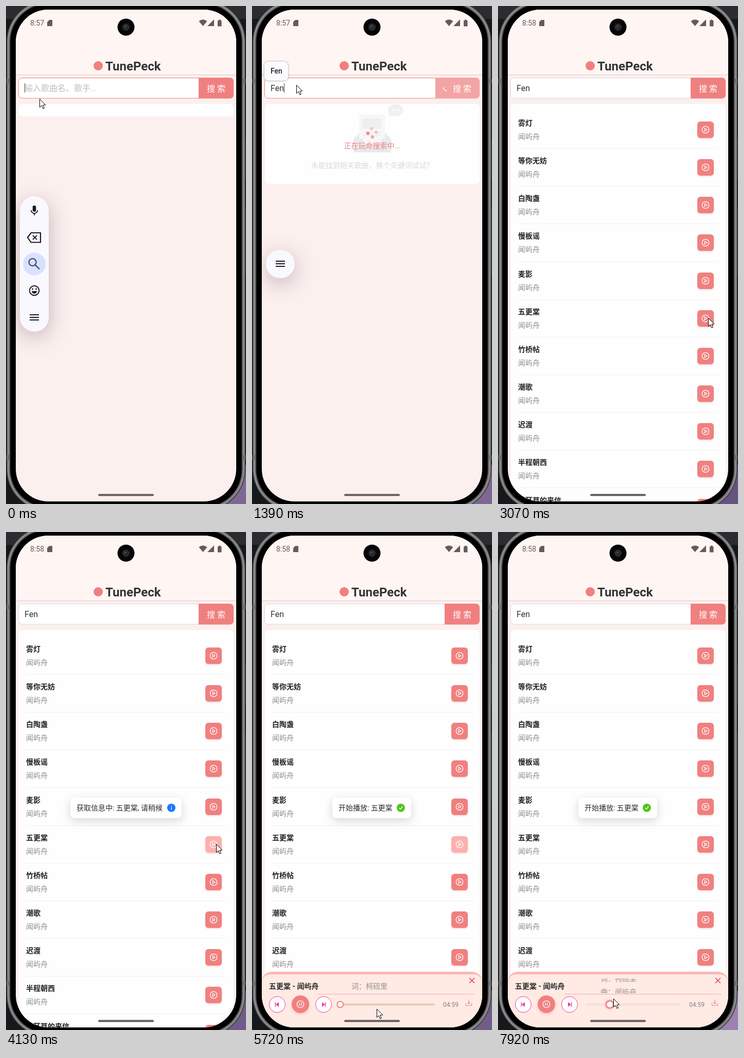
Write an HTML page with a canvas that moves like this. It is 466 by 966 pixels and loops after 7990 ms.

```html
<!DOCTYPE html>
<html lang="zh-CN">
<head>
<meta charset="utf-8">
<title>Music search</title>
<style>
html, body { margin: 0; width: 100%; height: 100%; overflow: hidden; background: #17181c; }
canvas { display: block; width: 466px; height: 966px; }
</style>
</head>
<body>
<canvas id="stage"></canvas>
<script>
const W = 466, H = 966, LOOP = 7990;
const CORAL = '#f08080', INK = '#1d1b20';
const FONT = 'Roboto, "Noto Sans CJK SC", "Noto Sans CJK", "Noto Sans", sans-serif';
const ARTIST = '闻屿舟', WRITER = '柯砚里', QUERY = 'Fen';
const SONGS = ['雾灯', '等你无妨', '白陶盏', '慢板谣', '麦影', '五更棠', '竹桥帖', '潮歌', '迟渡', '半程朝西', '苍耳草的来信'];
const PICK = 5;

const canvas = document.getElementById('stage');
const c = canvas.getContext('2d');
const dpr = window.devicePixelRatio || 1;
canvas.width = W * dpr;
canvas.height = H * dpr;

const clamp = (v, a = 0, b = 1) => Math.min(b, Math.max(a, v));
const lerp = (a, b, p) => a + (b - a) * p;
const ramp = (t, a, b) => clamp((t - a) / (b - a));
const ease = p => p * p * (3 - 2 * p);

// keys: [time, ...values]
function track(keys, t, curve = ease) {
  let i = 0;
  while (i < keys.length - 2 && t >= keys[i + 1][0]) i++;
  const [a, b] = [keys[i], keys[i + 1]];
  const p = curve(ramp(t, a[0], b[0]));
  return a.slice(1).map((v, k) => lerp(v, b[k + 1], p));
}

const POINTER = [
  [0, 65, 180], [59, 65, 180], [60, 86, 153], [1800, 86, 153], [2260, 100, 186],
  [2400, 100, 186], [3070, 408, 605], [4400, 408, 605], [5190, 160, 908],
  [5300, 160, 908], [5480, 48, 908], [5720, 242, 925], [5990, 256, 916],
  [6180, 256, 916], [6650, 170, 912], [6850, 176, 912], [6990, 219, 915],
  [7120, 214, 908], [7320, 178, 905], [7520, 178, 905], [7920, 224, 905], [7990, 226, 905]
];
const GLOW = [[0, .5], [1390, .5], [2400, .05], [4130, .3], [5720, .32], [6990, 1], [7990, .95]];

function withState(fn) { c.save(); fn(); c.restore(); }
function box(x, y, w, h, r, fill, stroke) {
  c.beginPath();
  c.roundRect(x, y, w, h, r);
  if (fill) { c.fillStyle = fill; c.fill(); }
  if (stroke) { c.strokeStyle = stroke; c.stroke(); }
}
function dot(x, y, r, fill, stroke, width = 1) {
  c.beginPath();
  c.arc(x, y, r, 0, 7);
  if (fill) { c.fillStyle = fill; c.fill(); }
  if (stroke) { c.lineWidth = width; c.strokeStyle = stroke; c.stroke(); }
}
function poly(pts, fill) {
  c.beginPath();
  pts.forEach(([x, y]) => c.lineTo(x, y));
  c.closePath();
  if (fill) { c.fillStyle = fill; c.fill(); }
}
function line(color, width, ...pts) {
  c.beginPath();
  pts.forEach(([x, y], i) => i ? c.lineTo(x, y) : c.moveTo(x, y));
  c.strokeStyle = color;
  c.lineWidth = width;
  c.stroke();
}
function text(s, x, y, size, color, weight = 400, align = 'left') {
  c.font = `${weight} ${size}px ${FONT}`;
  c.textAlign = align;
  c.fillStyle = color;
  c.fillText(s, x, y);
}
function shadow(color, blur, y) {
  c.shadowColor = color;
  c.shadowBlur = blur * dpr;
  c.shadowOffsetY = y * dpr;
}

function drawPhone(t) {
  c.fillStyle = '#17181c';
  c.fillRect(0, 0, W, H);
  c.fillStyle = '#2b2b30';
  c.fillRect(0, 0, W, 25);
  const g = track(GLOW, t, p => p)[0];
  const mix = (a, b) => Math.round(lerp(a, b, g));
  c.fillStyle = `rgb(${mix(92, 162)},${mix(74, 132)},${mix(117, 178)})`;
  c.fillRect(420, 890, 46, 76);
  [[0, '#333'], [1, '#686868'], [2.5, '#999'], [4.5, '#5a5a5a'], [5.5, '#8a8a8a'], [6.5, '#161616'], [8.5, '#000']]
    .forEach(([d, color]) => box(1 + d, -11 + d, 464 - 2 * d, 990 - 2 * d, 80 - d, color));
  c.fillStyle = '#6d6d6d';
  for (const x of [1, 459]) for (const y of [141, 871]) c.fillRect(x, y, 6, 9);
  c.fillStyle = '#333';
  c.fillRect(464, 257, 2, 78);
  c.fillRect(464, 391, 2, 130);
}

function drawHeader(t) {
  c.fillStyle = '#fcf0ef';
  c.fillRect(19, 7, 428, 954);
  c.fillStyle = '#fff6f4';
  c.fillRect(19, 7, 428, 126);
  c.fillStyle = '#e2c6c5';
  c.fillRect(19, 133, 428, 1);

  const gray = '#625d5d';
  text(t < 1550 ? '8:57' : '8:58', 47, 38, 14, gray);
  poly([[84, 27], [90, 27], [90, 39], [80, 39], [80, 31]], gray);
  c.beginPath();
  c.moveTo(382.5, 39);
  c.lineTo(374.5, 29.5);
  c.quadraticCurveTo(382.5, 23, 390.5, 29.5);
  c.fill();
  poly([[391, 39], [404, 39], [404, 26]], gray);
  box(411, 28, 7.5, 11.5, 1, gray);
  c.fillRect(413, 26.5, 3.5, 2);

  dot(233, 41, 16.5, '#050505');
  dot(233, 41, 8, '#17181a');
  dot(233, 41, 5, '#222326', '#4b4c50');
  dot(232, 40, 1.7, '#55565a');

  dot(179, 116, 9, CORAL);
  text('TunePeck', 193, 125, 24, '#333', 700);
}

function drawSearch(t) {
  const wide = ramp(t, 1000, 1060) * (1 - ramp(t, 2000, 2200));
  const edge = 374 - 18 * wide;
  const focused = t < 2470;
  c.lineWidth = 1;
  box(24.5, 139.5, edge - 24, 39.5, [7, 0, 0, 7], '#fff', focused ? CORAL : '#dcd6d6');
  box(edge, 139, 442 - edge, 40.5, [0, 7, 7, 0], wide > .5 ? '#f3a4a4' : CORAL);
  text('搜 索', 390, 166, 16, '#fff');
  if (wide > .5) withState(() => {
    c.lineCap = 'round';
    c.beginPath();
    const a = (t - 1390) / 1000 * 2 * Math.PI + Math.PI / 2;
    c.arc(378, 158, 6.5, a, a + Math.PI / 2);
    c.strokeStyle = '#fff';
    c.lineWidth = 1.4;
    c.stroke();
  });
  const typed = QUERY.slice(0, t < 400 ? 0 : 1 + Math.floor((t - 400) / 95));
  if (typed) text(typed, 36, 165, 16, '#333');
  else text('输入歌曲名、歌手...', 36, 165, 16, '#bfbfbf');
  const caretOn = t < 60 || (t >= 400 && t < 1800);
  if (caretOn) {
    c.fillStyle = '#444';
    c.fillRect(36 + (typed ? c.measureText(typed).width : 0), 150, 1, 18);
  }
}

function drawEmpty() {
  withState(() => {
    poly([[197, 258], [209, 246], [258, 246], [270, 258]], '#e9eaed');
    box(208, 211, 50, 60, 3, '#f7f7f8');
    box(214, 218, 37, 20, 2, '#eeeff1');
    for (const y of [244, 250]) box(214, y, 37, 2, 1, '#eeeff1');
    c.beginPath();
    c.moveTo(197, 258); c.lineTo(214, 258);
    c.quadraticCurveTo(219, 268, 224, 268);
    c.lineTo(243, 268);
    c.quadraticCurveTo(249, 268, 253, 258);
    c.lineTo(270, 258); c.lineTo(270, 280);
    c.quadraticCurveTo(270, 284, 266, 284);
    c.lineTo(201, 284);
    c.quadraticCurveTo(197, 284, 197, 280);
    c.fillStyle = '#e8eaed';
    c.fill();
    c.beginPath();
    c.ellipse(279, 202, 14.5, 11.5, 0, 0, 7);
    c.fillStyle = '#eef0f2';
    c.fill();
    poly([[267, 206], [265, 215], [275, 212]], '#eef0f2');
    for (const x of [273, 279, 285]) dot(x, 202, 1.8, '#fff');
    text('未能找到相关歌曲，换个关键词试试?', 230, 314, 14, '#d9d9d9', 400, 'center');
  });
}

function drawSpinner(t, alpha) {
  withState(() => {
    const a = (t - 1390) * .3 * Math.PI / 180 - .12;
    for (let i = 0; i < 4; i++) {
      const k = a + i * Math.PI / 2 - Math.PI / 2;
      c.globalAlpha = alpha * (.65 + .3 * Math.sin(t / 320 + i));
      dot(233 + 8 * Math.cos(k), 246 + 8 * Math.sin(k), 3.3, CORAL);
    }
    c.globalAlpha = alpha;
    text('正在玩命搜索中...', 233, 276, 14, CORAL, 400, 'center');
  });
}

function drawPlayIcon(x, y) {
  dot(x, y, 6.7, null, '#fff', 1.3);
  poly([[x - 1.8, y - 3], [x + 3, y], [x - 1.8, y + 3]]);
  c.lineWidth = 1.1;
  c.stroke();
}

function drawList(t) {
  const pale = ramp(t, 3470, 3560) * (1 - ramp(t, 7060, 7320));
  SONGS.forEach((name, i) => {
    const y = 73.15 * i;
    text(name, 39, 232 + y, 14, '#222', 700);
    text(ARTIST, 39, 258 + y, 14, '#8f8f8f');
    c.fillStyle = '#f0f0f0';
    c.fillRect(39, Math.round(276 + y), 389, 1);
    withState(() => {
      shadow('rgba(240,128,128,.28)', 3, 2);
      const p = i === PICK ? pale : 0;
      box(387, Math.round(224 + y), 32, 32, 6, `rgb(${lerp(240, 252, p)},${lerp(128, 176, p)},${lerp(128, 174, p)})`);
    });
    drawPlayIcon(403, Math.round(240 + y));
  });
}

function drawContent(t) {
  const loading = t >= 1000 && t < 1800;
  const listed = t >= 1800;
  box(25, 190, 417, listed ? 800 : loading ? 155 : 24, 8, '#fefefe');
  if (loading) drawEmpty();
  if (listed) withState(() => {
    c.globalAlpha = lerp(.5, 1, ramp(t, 1960, 2260));
    drawList(t);
  });
  const spin = ramp(t, 1000, 1100) * (1 - ramp(t, 1960, 2260));
  if (spin) drawSpinner(t, spin);
}

function menuIcon(y) {
  for (const d of [-5, 0, 5]) line(INK, 2, [46, y + d], [64, y + d]);
}

function drawToolbar(t) {
  if (t >= 2620) return;
  const p = ease(ramp(t, 560, 860));
  const top = lerp(369, 473, p), bottom = lerp(632, 528, p);
  withState(() => {
    c.globalAlpha = 1 - ramp(t, 2470, 2620);
    withState(() => {
      shadow('rgba(70,40,50,.3)', 40, 10);
      box(27, top, 56, bottom - top, 28, '#f9f8ff');
    });
    c.lineCap = 'butt';
    menuIcon(lerp(604, 500, p));
    c.globalAlpha *= 1 - ramp(p, 0, .6);
    if (p >= .6) return;
    box(51.7, 387, 6.6, 12, 3.3, INK);
    c.beginPath();
    c.arc(55, 396, 6.2, 0, Math.PI);
    c.lineWidth = 1.8;
    c.strokeStyle = INK;
    c.stroke();
    line(INK, 2, [55, 402], [55, 406]);

    poly([[42, 449], [48.5, 440], [67, 440], [67, 458.5], [48.5, 458.5]]);
    c.lineWidth = 2.2;
    c.stroke();
    line(INK, 2, [52, 445], [60, 453]);
    line(INK, 2, [60, 445], [52, 453]);

    c.beginPath();
    c.ellipse(55, 500.5, 22, 22, 0, 0, 7);
    c.fillStyle = '#d8e1ff';
    c.fill();
    const blue = '#3d4663';
    dot(51.5, 497, 7, null, blue, 2.2);
    line(blue, 2.4, [56.5, 502], [65, 510.5]);

    dot(55, 552, 9.3, null, INK, 2);
    dot(51.5, 549, 1.5, INK);
    dot(58.5, 549, 1.5, INK);
    c.beginPath();
    c.arc(55, 553, 5, 0, Math.PI);
    c.fill();
  });
}

function drawPopup(t) {
  if (t < 620 || t >= 2600) return;
  withState(() => {
    c.globalAlpha = 1 - ramp(t, 2470, 2600);
    withState(() => {
      shadow('rgba(0,0,0,.18)', 4, 1);
      box(23.5, 107, 47, 38, 8, '#fbfaff');
    });
    c.lineWidth = 1;
    box(23.5, 107, 47, 38, 8, null, '#cfcbd0');
    text(QUERY, 36, 131, 14, '#222', 500);
  });
}

function drawToast(t, start, end, x, w, label, color, ok) {
  if (t < start || t >= end) return;
  withState(() => {
    const p = ease(ramp(t, start, start + 300));
    c.globalAlpha = p;
    c.translate(0, -20 * (1 - p));
    withState(() => {
      shadow('rgba(0,0,0,.16)', 18, 5);
      box(x, 515, w, 40, 8, '#fff');
    });
    text(label, x + 12, 540, 14, '#2b2b2b');
    const cx = x + w - 20;
    dot(cx, 535, 8, color);
    if (ok) line('#fff', 1.5, [cx - 3.2, 535], [cx - .8, 537.6], [cx + 3.4, 532.2]);
    else {
      c.fillStyle = '#fff';
      c.fillRect(cx - .6, 533.5, 1.3, 5.5);
      c.fillRect(cx - .6, 530.8, 1.3, 1.5);
    }
  });
}

function skipButton(x, dir) {
  const pink = '#ee3d96';
  dot(x, 916.5, 15.5, '#fff', pink, 1);
  poly([[x - 3 * dir, 912], [x + 3 * dir, 916.5], [x - 3 * dir, 921]], pink);
  c.fillRect(x + 3.6 * dir - .7, 912, 1.4, 9);
}

function drawPlayer(t, px) {
  if (t < 4190) return;
  box(19, 853, 428, 120, [20, 20, 0, 0], '#ffb3b3');
  box(19, 858, 428, 110, [16, 16, 0, 0], '#ffeae4');
  line('#e5304f', 1.4, [422, 865], [432, 875]);
  line('#e5304f', 1.4, [432, 865], [422, 875]);
  text(`${SONGS[PICK]} - ${ARTIST}`, 33, 886, 14, '#2b2b2b', 700);
  c.fillStyle = '#f9abab';
  c.fillRect(128, 896, 305, 1);

  withState(() => {
    c.beginPath();
    c.rect(120, 866, 300, 29);
    c.clip();
    const up = Math.max(0, t - 7790) * .115;
    const x = 193 + Math.min(6, up * .6);
    text('词：' + WRITER, x, 886 - up, 14, '#949090');
    if (up) text('曲：' + ARTIST, x, 912 - up, 14, '#949090');
  });

  skipButton(49, -1);
  skipButton(139, 1);
  withState(() => {
    shadow('rgba(240,128,128,.4)', 5, 2);
    dot(94, 916, 17, CORAL);
  });
  dot(94, 916, 6.7, null, '#fff', 1.3);
  line('#fff', 1.3, [92, 913], [92, 919]);
  line('#fff', 1.3, [96, 913], [96, 919]);

  const drag = t >= 7320;
  const knob = drag ? Math.max(171, px - 7) : 171 + ramp(t, 5190, 6990);
  box(171, 914.5, 184, 4, 2, t >= 7520 ? '#fadfd9' : '#e9cab5');
  if (drag) dot(knob, 916.5, 10.5, 'rgba(240,128,128,.3)');
  dot(knob, 916.5, drag ? 7 : 6, '#fff', CORAL, drag ? 2.6 : 2);

  text('04:59', 371, 920.5, 12, '#8a8080');
  line(CORAL, 1.1, [415.5, 914], [415.5, 918.5], [426.5, 918.5], [426.5, 914]);
  line(CORAL, 1.1, [421, 907], [421, 915]);
  line(CORAL, 1.1, [418.5, 912.5], [421, 915], [423.5, 912.5]);
}

function drawPointer(x, y) {
  poly([[x, y], [x, y + 16], [x + 3.7, y + 12.6], [x + 6.4, y + 18.7], [x + 8.8, y + 17.6], [x + 6.3, y + 11.7], [x + 11.3, y + 11.5]], '#fff');
  c.lineWidth = 1;
  c.strokeStyle = '#000';
  c.stroke();
}

function render(t) {
  const [px, py] = track(POINTER, t);
  c.setTransform(dpr, 0, 0, dpr, 0, 0);
  drawPhone(t);
  withState(() => {
    c.beginPath();
    c.roundRect(19, 7, 428, 954, 63);
    c.clip();
    drawHeader(t);
    drawSearch(t);
    drawContent(t);
    drawToast(t, 3600, 4190, 125, 216, `获取信息中: ${SONGS[PICK]}, 请稍候`, '#1677ff', false);
    drawToast(t, 4460, LOOP, 156, 153, `开始播放: ${SONGS[PICK]}`, '#52c41a', true);
    drawPlayer(t, px);
    drawToolbar(t);
    drawPopup(t);
    box(179, 946.5, 108, 4, 2, '#625d5d');
  });
  drawPointer(px + .5, py + .5);
}

const begin = performance.now();
function tick() {
  render((performance.now() - begin) % LOOP);
  requestAnimationFrame(tick);
}
tick();
</script>
</body>
</html>
```
